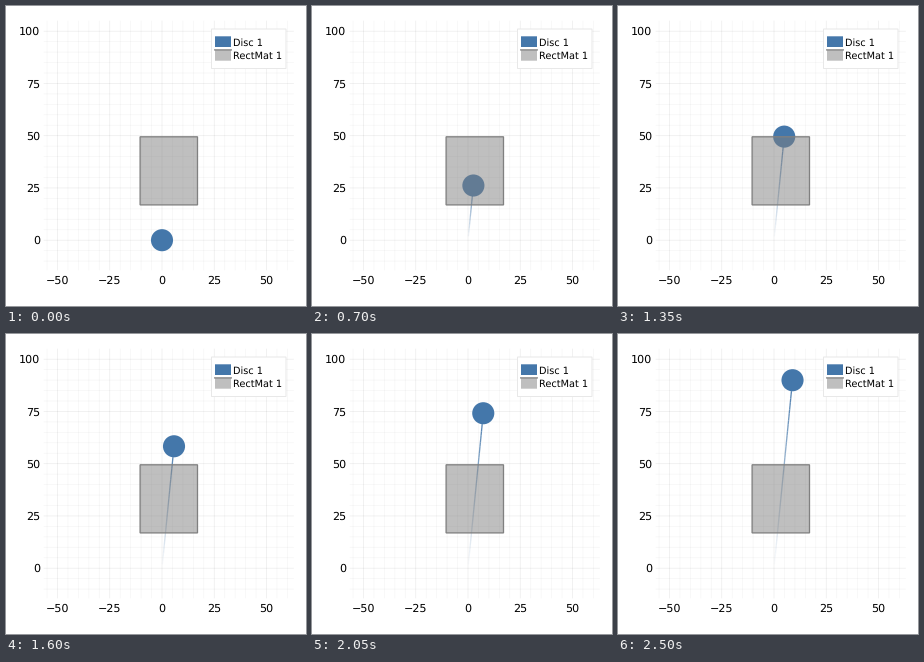
Animation of 300x300 px, one loop 2.55 s. Source, as a matplotlib script:

```python
import matplotlib.pyplot as plt
import numpy as np
from matplotlib.animation import FuncAnimation
from matplotlib.collections import LineCollection
from matplotlib.patches import Circle, Rectangle

plt.rcParams.update({
    "font.family": "DejaVu Sans",
    "text.hinting": "no_hinting",
    "toolbar": "None",
    "path.snap": False,       # keep soft, sub-pixel edges
})

SIZE, DPI = 300, 100
PT = 72 / DPI                 # points per pixel
FRAMES, INTERVAL = 51, 50
SCALE = 2.09                  # pixels per data unit
ORIGIN = np.array([156.0, 234.2])
LEFT, RIGHT, TOP, BOTTOM = 38, 287.5, 15, 264
STROKE = 1.3 * PT
BLUE = "#4477aa"
GRAY = "#808080"
GRAY_FILL = (0.5, 0.5, 0.5, 0.5)

# Motion: constant speed, friction while crossing the mat, constant speed again
SPEED, DRAG, SLOPE = 1.875, 0.0066, 0.0985
ENTER, LEAVE = 9, 27


def to_px(x, y):
    return ORIGIN[0] + SCALE * x, ORIGIN[1] - SCALE * y


def disc_center(n):
    slow = min(max(n - ENTER, 0), LEAVE - ENTER)
    after = max(n - LEAVE, 0)
    y = SPEED * n - DRAG * (slow ** 2 / 2 + slow * after)
    return to_px(SLOPE * y, y)


fig = plt.figure(figsize=(SIZE / DPI, SIZE / DPI), dpi=DPI, facecolor="white")
ax = fig.add_axes([0, 0, 1, 1])
ax.set_xlim(0, SIZE)
ax.set_ylim(SIZE, 0)
ax.axis("off")


def draw_grid():
    for v in range(-55, 105, 5):
        x, y = to_px(v, v)
        alpha = 0.08 if v % 25 == 0 else 0.04
        style = dict(color="black", alpha=alpha, lw=0.7 * PT, zorder=0)
        if LEFT <= x <= RIGHT:
            ax.plot([x, x], [TOP, BOTTOM], **style)
        if TOP <= y <= BOTTOM:
            ax.plot([LEFT, RIGHT], [y, y], **style)


def label(x, y, text, align, size=8):
    ax.text(x, y, text, ha=align, va="baseline", fontsize=size, zorder=8)


def box(x, y, w, h, face, edge, z, lw=STROKE):
    ax.add_patch(Rectangle((x, y), w, h, fc=face, ec=edge, lw=lw, zorder=z))


def draw_labels():
    for v in range(-50, 51, 25):
        label(to_px(v, 0)[0], 278, str(v).replace("-", "\u2212"), "center")
    for v in range(0, 101, 25):
        label(34, to_px(0, v)[1] + 4, str(v), "right")


def draw_legend():
    box(205.5, 23, 74.5, 39.5, "white", "#e8e8e8", 6, PT)
    box(209, 30.3, 16, 10.7, BLUE, "none", 7)
    box(209, 44, 16, 10.7, GRAY_FILL, "none", 7)
    ax.plot([208.7, 225.3], [43.9, 43.9], color=GRAY, lw=STROKE, zorder=7)
    label(227, 40, "Disc 1", "left", 7)
    label(227, 53, "RectMat 1", "left", 7)


draw_grid()
draw_labels()
draw_legend()
box(134.1, 130.8, 57.4, 68.1, GRAY_FILL, GRAY, 4)

path = np.array([disc_center(n) for n in range(FRAMES)])
pieces = np.stack([path[:-1], path[1:]], axis=1)
trail = LineCollection([], linewidths=STROKE, zorder=2)
ax.add_collection(trail)
disc = Circle(path[0], 11.05, fc=BLUE, ec="none", zorder=3)
ax.add_patch(disc)


def update(n):
    disc.center = path[n]
    # The trail fades from clear at the start to solid at the disc
    trail.set_segments(pieces[:n])
    trail.set_color([(0.267, 0.467, 0.667, k / n) for k in range(n)])
    return disc, trail


anim = FuncAnimation(fig, update, frames=FRAMES, interval=INTERVAL,
                     repeat=True, repeat_delay=0)
plt.show()
```
